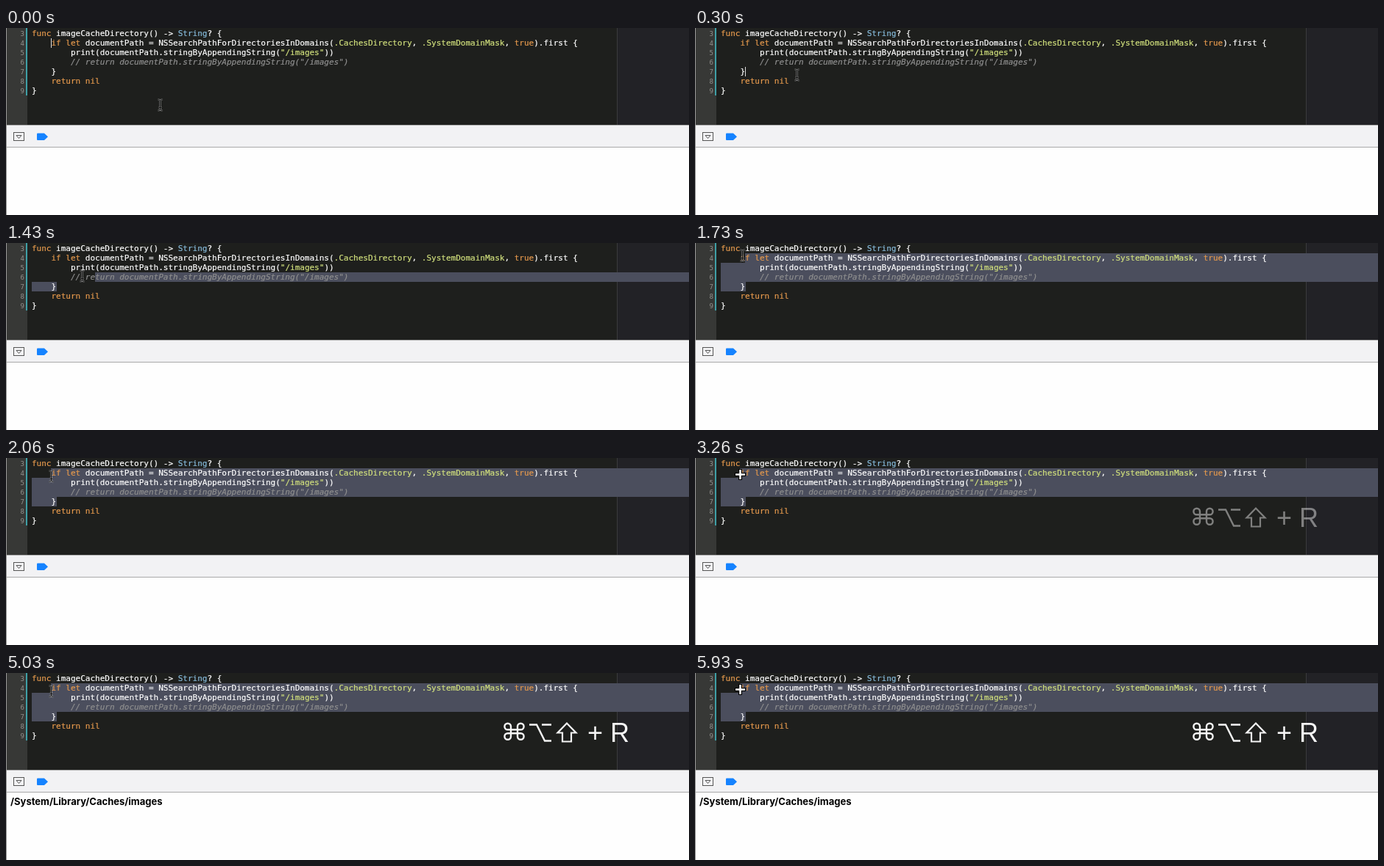
These frames come from a looping animation (928 px wide and 255 px high, 6430 ms). An HTML page:

```html
<!DOCTYPE html>
<html lang="en">
<head>
<meta charset="utf-8">
<title>Run selected code</title>
<style>
html, body { margin: 0; width: 100%; height: 100%; overflow: hidden; background: #fefefe; }
svg { display: block; }
text { white-space: pre; }
#code { font: 11px "DejaVu Sans Mono", monospace; fill: #fff; stroke: #fff; stroke-width: .2; }
#nums { font: 9px "DejaVu Sans Mono", monospace; fill: #92928e; text-anchor: end; }
#code .k { fill: #e5994d; stroke: #e5994d; }
#code .t { fill: #87bcdc; stroke: #87bcdc; }
#code .s { fill: #d2e17d; stroke: #d2e17d; }
#code .c { fill: #8f8f8f; stroke: #8f8f8f; font-style: italic; }
#out { font: bold 13px Inter, sans-serif; }
#hud { fill: none; stroke: #f5f5f5; stroke-width: 2.4; }
#hud text { font: 36px "Liberation Sans", Arial, sans-serif; fill: #f5f5f5; stroke: none; }
#beam, #cross { fill: none; }
</style>
</head>
<body>
<svg width="928" height="255" viewBox="0 0 928 255">
  <rect width="928" height="132" fill="#1e1f1d"/>
  <rect x="830" width="98" height="132" fill="#222226"/>
  <rect x="830" width="1" height="132" fill="#3b3b3d"/>
  <rect width="29" height="132" fill="#373836"/>
  <rect x="27" width="2" height="92" fill="#3f9fa6"/>
  <g id="sel" fill="#4b4e5d"></g>
  <g id="nums"></g>
  <g id="code"></g>
  <rect id="caret" width="1" height="13" fill="#ddd"/>

  <rect y="132" width="928" height="31" fill="#a9a9a9"/>
  <rect y="133" width="928" height="29" fill="#f2f2f4"/>
  <rect width="1" height="255" fill="#999"/>
  <g fill="none" stroke="#555">
    <rect x="10.5" y="142.5" width="14" height="11"/>
    <path d="M14 146.5h7l-3.5 4z"/>
  </g>
  <path d="M43 143.5h9l5 4.7-5 4.7h-9q-1 0-1-1v-7.4q0-1 1-1z" fill="#1583ff"/>
  <text id="out" x="6" y="180">/System/Library/Caches/images</text>

  <g id="hud">
    <path d="M686 77v9.500a4.300 4.300 0 1 1-4.300-4.300h17.600a4.300 4.300 0 1 1-4.300 4.300V73a4.300 4.300 0 1 1 4.300 4.300h-17.600a4.300 4.300 0 1 1 4.300-4.300z"/>
    <path d="M711 70.500h10l11 22h9M728 70.500h13"/>
    <path d="M762 68.500L749.500 81.500h6.500v12h12v-12h6.500z" stroke-width="2.200"/>
    <text x="790" y="94">+ R</text>
  </g>
  <g id="beam">
    <path d="M-3-7.500Q0-7.500 0-5V5Q0 7.500-3 7.500M3-7.500Q0-7.500 0-5V5Q0 7.500 3 7.500M-2 3.500H2" stroke="#ccc" stroke-opacity=".65" stroke-width="2.200"/>
    <path d="M-3-7.500Q0-7.500 0-5V5Q0 7.500-3 7.500M3-7.500Q0-7.500 0-5V5Q0 7.500 3 7.500M-2 3.500H2" stroke="#111"/>
  </g>
  <g id="cross">
    <path d="M54 22.500H69M61.500 15V30" stroke="#000" stroke-width="5"/>
    <path d="M55 22.500H68M61.500 16V29" stroke="#fff" stroke-width="2.600"/>
  </g>
</svg>
<script>
const LOOP = 6430, LEFT = 35, CHAR = 6.622, ROW = 13, TOP = 1, LAST = 4, END_COL = 5;
const $ = id => document.getElementById(id);

// Each line is a list of [class, text] runs.
const lines = [
  [['k', 'func'], ['', ' imageCacheDirectory() -> '], ['t', 'String'], ['', '? {']],
  [['k', '    if let'], ['', ' documentPath = NSSearchPathForDirectoriesInDomains('], ['s', '.CachesDirectory'],
   ['', ', '], ['s', '.SystemDomainMask'], ['', ', '], ['k', 'true'], ['', ').first {']],
  [['', '        print(documentPath.stringByAppendingString('], ['s', '"/images"'], ['', '))']],
  [['c', '        // return documentPath.stringByAppendingString("/images")']],
  [['', '    }']],
  [['k', '    return nil']],
  [['', '}']]
];
const lengths = lines.map(runs => runs.reduce((n, [, s]) => n + s.length, 0));

lines.forEach((runs, i) => {
  const y = TOP + ROW * i + 10;
  const spans = runs.map(([cls, s]) => `<tspan class="${cls}">${s.replace(/>/g, '&gt;')}</tspan>`);
  $('code').innerHTML += `<text x="${LEFT}" y="${y}">${spans.join('')}</text>`;
  $('nums').innerHTML += `<text x="25" y="${y}">${i + 3}</text>`;
});

// Pointer path: time, x, y
const path = [
  [0, 209, 104.5], [60, 203, 101], [150, 176, 84], [230, 150, 69], [300, 138, 63.5], [1330, 138, 63.5],
  [1360, 131, 57], [1430, 103, 44.5], [1530, 80, 28], [1650, 66, 15.5], [1800, 63, 18],
  [1960, 62, 26], [2060, 61, 25], [LOOP, 61, 25]
];

function pointer(t) {
  const i = Math.max(1, path.findIndex(p => p[0] >= t));
  const [t0, x0, y0] = path[i - 1], [t1, x1, y1] = path[i];
  const u = Math.max(0, (t - t0) / (t1 - t0));
  return [x0 + (x1 - x0) * u, y0 + (y1 - y0) * u];
}

// The selection trails the pointer a little and is anchored after the inner brace.
function selection(t) {
  if (t < 1370) return '';
  const [x, y] = pointer(t - 45);
  const first = Math.min(LAST, Math.floor((y - TOP) / ROW));
  const col = Math.min(lengths[first], Math.max(0, Math.round((x - LEFT) / CHAR)));
  let rects = '';
  for (let r = first; r <= LAST; r++) {
    const x0 = r === first ? Math.round(LEFT + col * CHAR) : LEFT;
    const x1 = r === LAST ? Math.round(LEFT + END_COL * CHAR) + 1 : 928;
    rects += `<rect x="${x0}" y="${TOP + r * ROW}" width="${Math.max(0, x1 - x0)}" height="${ROW}"/>`;
  }
  return rects;
}

function show(id, on) {
  $(id).style.display = on ? '' : 'none';
}

function draw(now) {
  const t = now % LOOP;
  const [x, y] = pointer(t);
  const crossed = t >= 2860 && t < 3460 || t >= 5930;
  $('beam').setAttribute('transform', `translate(${Math.round(x) + .5} ${Math.round(y)})`);
  show('beam', !crossed);
  show('cross', crossed);

  const clicked = t >= 300;
  $('caret').setAttribute('x', clicked ? 68 : 61);
  $('caret').setAttribute('y', clicked ? 53 : 14);
  show('caret', t < 800);

  $('sel').innerHTML = selection(t);
  const step = Math.floor((t - 2860) / 97) + 1;
  $('hud').style.opacity = Math.min(1, Math.max(0, step / 11));
  show('out', t >= 5030);
}

let start;
function tick(now) {
  start ??= now;
  draw(now - start);
  requestAnimationFrame(tick);
}
draw(0);
requestAnimationFrame(tick);
</script>
</body>
</html>
```
